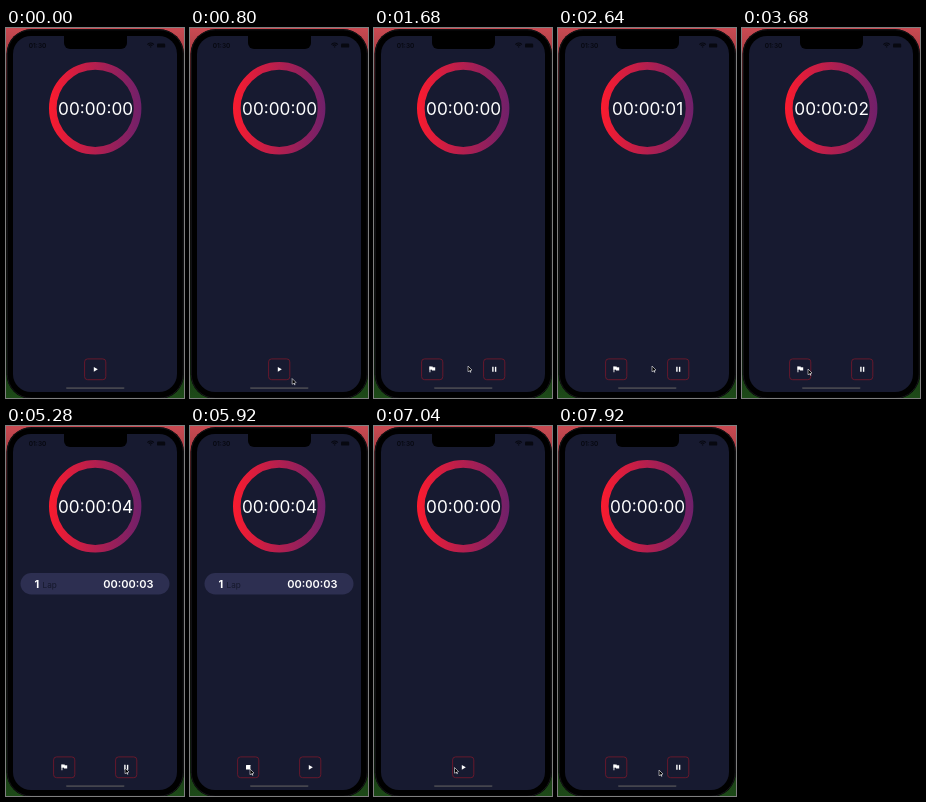
Write an HTML page with a canvas that moves like this. It is 178 px wide and 370 px high and loops after 8 s.

```html
<!DOCTYPE html>
<html lang="en">
<head>
<meta charset="utf-8">
<title>Stopwatch</title>
<style>
html, body { margin: 0; width: 100%; height: 100%; overflow: hidden; background: #000; }
canvas { display: block; width: 178px; height: 370px; }
</style>
</head>
<body>
<canvas id="stage"></canvas>
<script>
const W = 178, H = 370, MID = 89.2, LOOP = 8000;
const START = 1200, LAP = 4280, PAUSE = 5360, RESET = 6240, RESTART = 7240;
const NAVY = '#171a30', INK = '#070810', GLIDE = 440;
const canvas = document.getElementById('stage');
const scale = window.devicePixelRatio || 1;
canvas.width = W * scale;
canvas.height = H * scale;
const c = canvas.getContext('2d');
c.scale(scale, scale);

// The pointer leaves for its next place after each press
const moves = [
  { at: 640, x: 104, y: 352 },
  { at: 700, x: 90, y: 341 },
  { at: START, x: 94, y: 338 },
  { at: 3000, x: 66, y: 341 },
  { at: LAP, x: 119, y: 342 },
  { at: PAUSE, x: 60, y: 343 },
  { at: RESET, x: 80.5, y: 341.5 },
  { at: RESTART, x: 101, y: 344 }
];

function fillBox(x, y, w, h, r, color) {
  c.beginPath();
  c.roundRect(x, y, w, h, r);
  c.fillStyle = color;
  c.fill();
}

function strokeBox(x, y, w, h, r, color, width) {
  c.beginPath();
  c.roundRect(x, y, w, h, r);
  c.strokeStyle = color;
  c.lineWidth = width;
  c.stroke();
}

function triangle(x, y, ax, ay, bx, by, color) {
  c.beginPath();
  c.moveTo(x, y);
  c.lineTo(x + ax, y + ay);
  c.lineTo(x + bx, y + by);
  c.closePath();
  c.fillStyle = color;
  c.fill();
}

function arc(x, y, r, from, to, color, width) {
  c.beginPath();
  c.arc(x, y, r, from, to);
  c.strokeStyle = color;
  c.lineWidth = width;
  c.stroke();
}

function gradient(x0, y0, x1, y1, ...colors) {
  const g = c.createLinearGradient(x0, y0, x1, y1);
  colors.forEach((color, i) => g.addColorStop(i / (colors.length - 1), color));
  return g;
}

function text(s, x, y, size, weight, color, align = 'left') {
  c.font = `${weight} ${size}px Inter, "Liberation Sans", sans-serif`;
  c.textAlign = align;
  c.fillStyle = color;
  c.fillText(s, x, y);
}

function clock(ms) {
  const s = Math.floor(ms / 1000);
  return [Math.floor(s / 3600), Math.floor(s / 60) % 60, s % 60]
    .map(n => String(n).padStart(2, '0')).join(':');
}

function drawPhone() {
  c.fillStyle = gradient(0, 0, 0, H, '#c94a52', '#5a2024', '#181414', '#142012', '#1d4a18');
  c.fillRect(0, 0, W, H);
  fillBox(0.5, 1, 177.5, 370, 25, '#000');
  strokeBox(1.3, 1.8, 175.9, 368.4, 24, '#1c1c20', 0.8);
  fillBox(7, 8, 164, 356, 18, NAVY);
  fillBox(58, 5, 63, 16, [0, 0, 6, 6], '#000');
  fillBox(60, 359.3, 58.5, 1.6, 0.8, '#45464e');
}

function drawStatus() {
  text('01:30', 22.8, 20.2, 6.5, 600, INK);
  for (const r of [2.4, 4.2]) arc(144.6, 19.3, r, -Math.PI * 0.77, -Math.PI * 0.23, INK, 1.2);
  fillBox(143.9, 18.2, 1.4, 1.4, 0.7, INK);
  fillBox(151, 15.6, 8.2, 4, 1.2, INK);
}

function drawDial(ms) {
  const fade = gradient(43, 80, 135, 80, '#fb1b2e', '#b31f4f', '#70206a');
  arc(MID, 80.3, 42.4, 0, Math.PI * 2, fade, 7.6);
  text(clock(ms), MID + 0.4, 86.7, 17.2, 400, '#fff', 'center');
}

function drawLap() {
  fillBox(14.5, 147, 149, 21.5, 10.75, '#2d2f51');
  text('1', 28.5, 162, 11, 700, '#fff');
  text('Lap', 36.5, 161.8, 8.2, 400, '#15182b');
  text(clock(LAP - START), 122.3, 162, 11, 600, '#fff', 'center');
}

// Icons are drawn around the centre of their button
const icons = {
  play: (x, y) => triangle(x - 1.4, y - 2.4, 4, 2.4, 0, 4.8, '#fff'),
  pause: (x, y) => [-2, 0.7].forEach(d => fillBox(x + d, y - 2.5, 1.4, 5, 0, '#fff')),
  stop: (x, y) => fillBox(x - 2.2, y - 2.2, 4.4, 4.4, 0.2, '#fff'),
  flag: (x, y) => {
    fillBox(x - 2.7, y - 2.8, 0.9, 5.8, 0, '#fff');
    fillBox(x - 2.7, y - 2.8, 3.2, 3.2, 0, '#fff');
    fillBox(x - 0.2, y - 2, 3.2, 3.2, 0, '#fff');
  }
};

function drawButton(icon, x) {
  const y = 341.3;
  strokeBox(x - 10.6, y - 10.4, 21.2, 20.8, 3, '#70192c', 0.9);
  icons[icon](x, y);
}

function pointerAt(t) {
  const i = moves.findLastIndex(m => m.at <= t);
  if (i < 0) return null;
  const to = moves[i], from = moves[Math.max(i - 1, 0)];
  const u = Math.min((t - to.at) / GLIDE, 1);
  const k = u * u * (3 - 2 * u);
  return [from.x + (to.x - from.x) * k, from.y + (to.y - from.y) * k];
}

function drawPointer(t) {
  const place = pointerAt(t);
  if (!place) return;
  c.save();
  c.translate(...place);
  c.strokeStyle = '#d0d0d4';
  c.lineWidth = 0.7;
  triangle(0, 0, 0, 5.7, 4, 4, '#000');
  c.stroke();
  c.beginPath();
  c.moveTo(1.9, 4.6);
  c.lineTo(2.9, 6.6);
  c.lineWidth = 1.1;
  c.stroke();
  c.restore();
}

function draw(t) {
  const idle = t < START || (t >= RESET && t < RESTART);
  const paused = t >= PAUSE && t < RESET;
  const elapsed = idle ? 0 : t >= RESTART ? t - RESTART : Math.min(t, PAUSE) - START;
  drawPhone();
  drawStatus();
  drawDial(elapsed);
  if (t >= LAP && t < RESET) drawLap();
  if (idle) {
    drawButton('play', MID);
  } else {
    drawButton(paused ? 'stop' : 'flag', MID - 31);
    drawButton(paused ? 'play' : 'pause', MID + 31);
  }
  drawPointer(t);
}

const origin = performance.now();
function tick() {
  draw((performance.now() - origin) % LOOP);
  requestAnimationFrame(tick);
}
tick();
</script>
</body>
</html>
```
